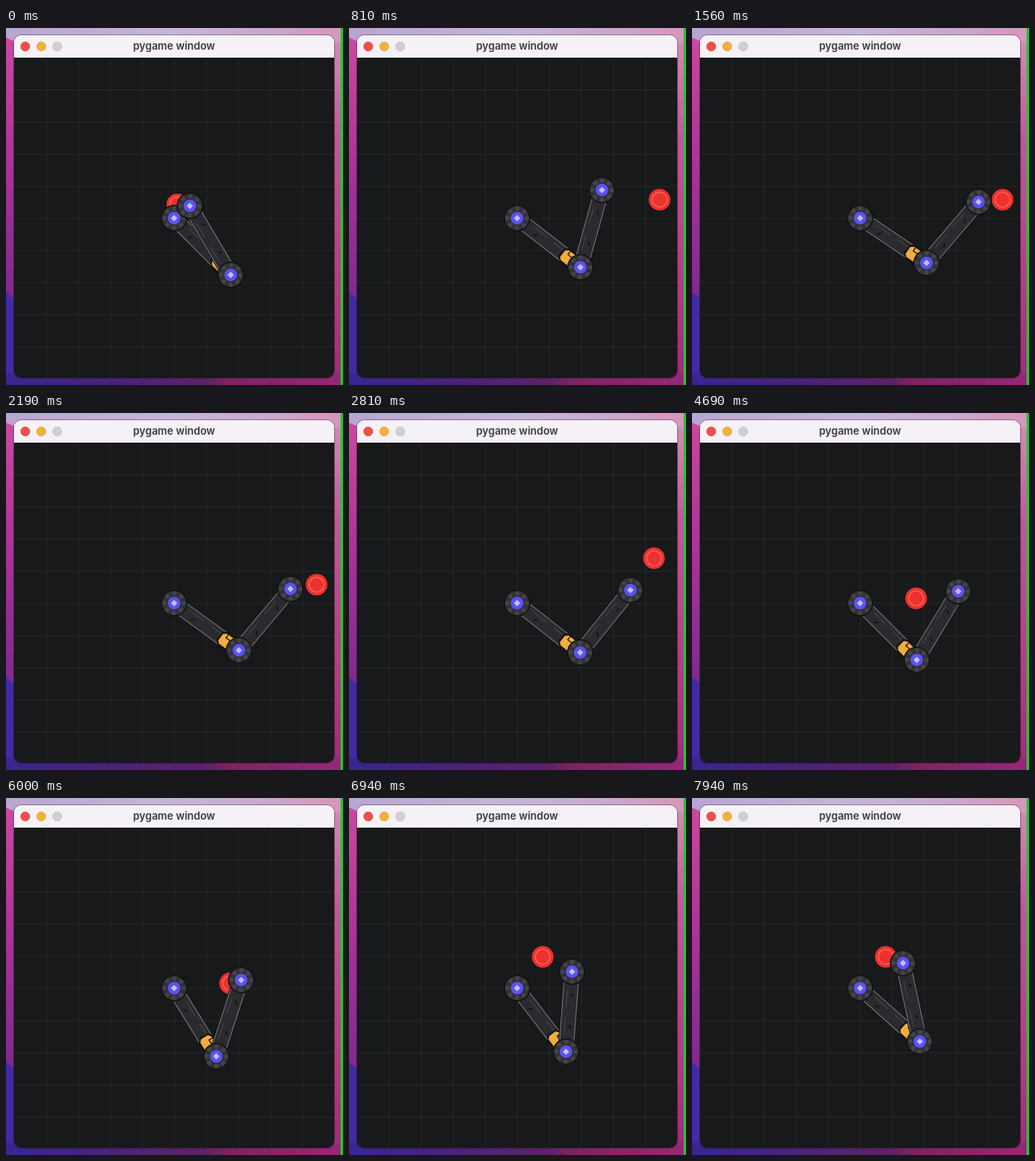
An HTML page that plays this animation: 421 by 445 pixels, repeating every 8 s.

```html
<!DOCTYPE html>
<html lang="en">
<head>
<meta charset="utf-8">
<title>Two-link arm</title>
<style>
html, body { margin: 0; width: 100%; height: 100%; overflow: hidden; background: #18191b; }
svg { display: block; width: 421px; height: 445px; }
text { font: 600 13px Inter, sans-serif; fill: #3c393e; text-anchor: middle; }
</style>
</head>
<body>
<svg viewBox="0 0 421 445">
  <defs>
    <linearGradient id="top">
      <stop offset="0" stop-color="#b9a5d3"/><stop offset=".5" stop-color="#c6b5d9"/>
      <stop offset=".76" stop-color="#c9a9cf"/><stop offset="1" stop-color="#d795bb"/>
    </linearGradient>
    <linearGradient id="left" x2="0" y2="1">
      <stop offset="0" stop-color="#c9499f"/><stop offset=".5" stop-color="#a83396"/>
      <stop offset="1" stop-color="#7d2a8c"/>
    </linearGradient>
    <linearGradient id="right" x2="0" y2="1">
      <stop offset="0" stop-color="#d391b8"/><stop offset=".3" stop-color="#c2589b"/>
      <stop offset=".75" stop-color="#b23a80"/><stop offset="1" stop-color="#9c2a78"/>
    </linearGradient>
    <linearGradient id="bottom">
      <stop offset="0" stop-color="#3a2591"/><stop offset=".22" stop-color="#43237f"/>
      <stop offset=".6" stop-color="#5c2268"/><stop offset=".66" stop-color="#7d2360"/>
      <stop offset="1" stop-color="#982678"/>
    </linearGradient>
    <pattern id="grid" x="10" y="37" width="40" height="40" patternUnits="userSpaceOnUse">
      <path d="M0 .5H40M.5 0V40" stroke="#242628"/>
    </pattern>
    <clipPath id="win"><rect x="10" y="9" width="400" height="427" rx="9"/></clipPath>
    <g id="link">
      <rect x="13" y="-10.5" width="74" height="21" fill="#111214"/>
      <rect x="14" y="-9" width="72" height="18" fill="#2b2b2f"/>
      <path d="M14 -9H86M14 9H86" stroke="#6c6c71" stroke-width="1.2"/>
      <path d="M21 -4H43M55 -4H77" stroke="#46464b"/>
      <path d="M29 4.5L33 1M69 4.5L73 1" stroke="#131315" stroke-width="1.8"/>
    </g>
    <g id="joint">
      <circle r="16.5" fill="#121315"/>
      <circle r="15" fill="#323236"/>
      <circle r="12" fill="none" stroke="#454549" stroke-width="5" stroke-dasharray="4.71 4.71" stroke-dashoffset="2.3"/>
      <circle r="9" fill="#29292f"/>
      <circle r="8" fill="#5b52ee"/>
      <path d="M0 -4L4 0L0 4L-4 0Z" fill="#c3c1fa"/>
    </g>
  </defs>

  <rect width="421" height="445" fill="#a83396"/>
  <rect y="10" width="20" height="330" fill="url(#left)"/>
  <path d="M0 329L20 345V445H0Z" fill="#432aa4"/>
  <rect x="400" width="21" height="445" fill="url(#right)"/>
  <rect y="430" width="418" height="15" fill="url(#bottom)"/>
  <rect width="418" height="18" fill="url(#top)"/>
  <path d="M0 12L14 18H0Z" fill="#c9499f"/>
  <rect x="418" width="3" height="445" fill="#20c832"/>
  <rect x="9.5" y="8.5" width="401" height="428" rx="9.5" fill="none" stroke="#000" stroke-opacity=".3"/>

  <g clip-path="url(#win)">
    <rect x="10" y="9" width="400" height="28" fill="#f5f1f7"/>
    <rect x="10" y="37" width="400" height="399" fill="#18191b"/>
    <rect x="11" y="38" width="399" height="398" fill="url(#grid)"/>
    <path d="M10 37.5H410" stroke="#0c0c0d"/>
    <circle cx="24" cy="23" r="5.7" fill="#ec5049" stroke="#d5443e" stroke-width=".6"/>
    <circle cx="44" cy="23" r="5.7" fill="#f4b03e" stroke="#dc9c32" stroke-width=".6"/>
    <circle cx="64" cy="23" r="5.7" fill="#d2ced4" stroke="#bab6bc" stroke-width=".6"/>
    <text x="210" y="27.3">pygame window</text>

    <g id="target">
      <circle r="13.5" fill="#ec322f"/>
      <circle r="9.3" fill="none" stroke="#fa6a60" stroke-width="1.3"/>
    </g>
    <g id="upper">
      <use href="#link"/>
      <path d="M70 -7L75 -10H88V10H75L70 6Z" fill="#111214"/>
      <path d="M72 -5L76 -8H86V8H75L72 5Z" fill="#f4ac3f"/>
      <path d="M78 -8V-3H86" fill="none" stroke="#17130c" stroke-width="1.3"/>
    </g>
    <use href="#joint" x="210" y="237"/>
    <g id="fore"><use href="#link"/></g>
    <use id="elbow" href="#joint"/>
    <use id="hand" href="#joint"/>
  </g>
</svg>
<script>
const LOOP = 8000, STEP = 62.5, REACH = 100;
const BASE = { x: 210, y: 237 };

// time, upper arm angle, forearm angle (degrees)
const poses = [
  [0, 45, -120.7],
  [1560, 33.9, -49.5],
  [2810, 38, -51.1],
  [3560, 23, -59.3],
  [4690, 45, -58.8],
  [6000, 58.2, -71.9],
  [7940, 41.7, -102.2]
];

// time, x, y
const goals = [
  [0, 214, 220],
  [120, 388, 214],
  [2300, 381, 181],
  [3680, 280, 231],
  [6560, 242, 198]
];

const el = id => document.getElementById(id);
const place = (id, p, deg = 0) =>
  el(id).setAttribute('transform', `translate(${p.x} ${p.y}) rotate(${deg})`);

function tip(p, deg) {
  const a = deg * Math.PI / 180;
  return { x: p.x + REACH * Math.cos(a), y: p.y + REACH * Math.sin(a) };
}

const slope = (i, k) =>
  (poses[i + 1][k] - poses[i][k]) / (poses[i + 1][0] - poses[i][0]);

// Tangent that keeps the curve from overshooting its keys
function tangent(i, k) {
  if (i === 0) return slope(0, k);
  if (i === poses.length - 1) return slope(i - 1, k);
  const a = slope(i - 1, k), b = slope(i, k);
  return a * b > 0 ? 2 * a * b / (a + b) : 0;
}

function angle(t, k) {
  let i = 0;
  while (i < poses.length - 2 && t >= poses[i + 1][0]) i++;
  const p = poses[i], q = poses[i + 1], h = q[0] - p[0];
  const u = Math.min(1, (t - p[0]) / h), v = 1 - u;
  return v * v * (1 + 2 * u) * p[k] + u * u * (3 - 2 * u) * q[k]
    + h * u * v * (v * tangent(i, k) - u * tangent(i + 1, k));
}

function draw(ms) {
  const t = Math.floor((ms % LOOP + 2.6) / STEP) * STEP;
  const [, x, y] = goals.filter(g => g[0] <= t).pop();
  const a = angle(t, 1), b = angle(t, 2);
  const elbow = tip(BASE, a), hand = tip(elbow, b);
  place('target', { x, y });
  place('upper', BASE, a);
  place('fore', elbow, b);
  place('elbow', elbow);
  place('hand', hand);
}

let start;
function tick(now) {
  start ??= now;
  draw(now - start);
  requestAnimationFrame(tick);
}
draw(0);
requestAnimationFrame(tick);
</script>
</body>
</html>
```
